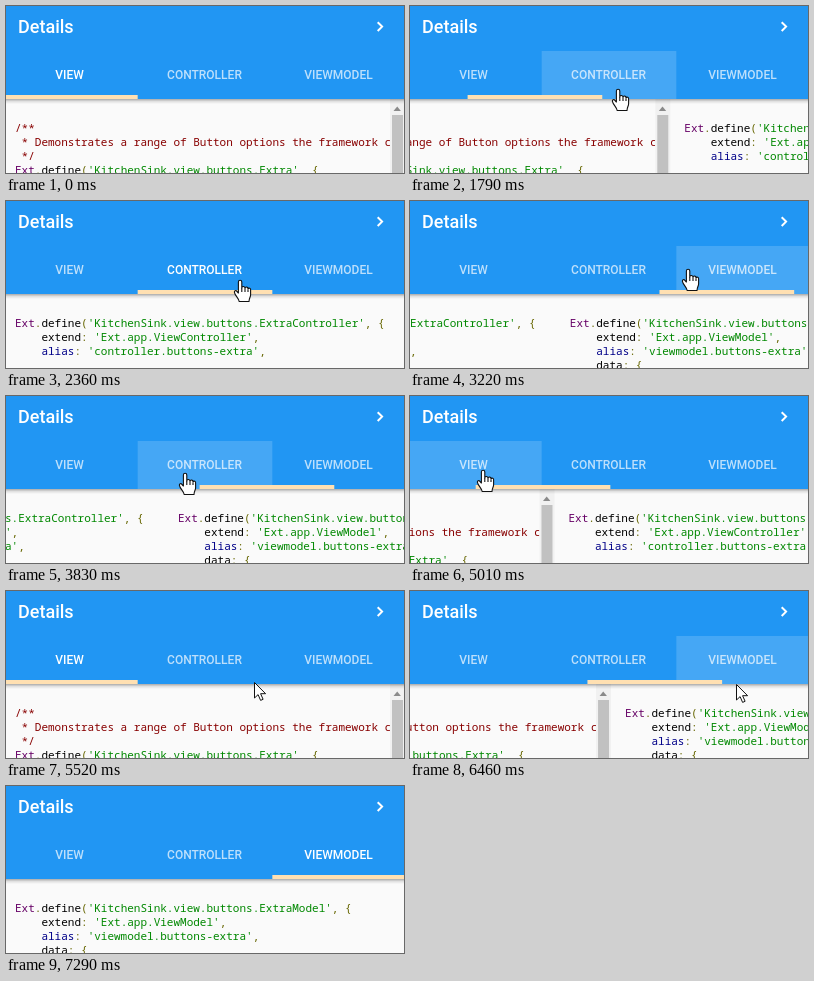
Write an HTML page that moves like this. It is 398 px wide and 167 px high and loops after 8090 ms.

```html
<!DOCTYPE html>
<html lang="en">
<head>
<meta charset="utf-8">
<title>Details tabs</title>
<style>
  html, body { margin: 0; width: 100%; height: 100%; overflow: hidden; background: #fafafa; }
  svg { display: block; width: 398px; height: 167px; }
  text { white-space: pre; }
  .title { font: 500 18px Roboto, sans-serif; fill: #fff; }
  .tab { font: 500 12px Roboto, sans-serif; fill: #fff; text-anchor: middle; }
  .code { font: 11px "Noto Sans Mono", "DejaVu Sans Mono", monospace; fill: #000; }
  .com { fill: #800; }
  .str { fill: #080; }
  .typ { fill: #606; }
  .kwd { fill: #008; }
  .pun { fill: #660; }
</style>
</head>
<body>
<svg id="stage" viewBox="0 0 398 167">
  <defs>
    <linearGradient id="shade" x1="0" y1="0" x2="0" y2="1">
      <stop offset="0" stop-color="#000" stop-opacity=".32"/>
      <stop offset=".5" stop-color="#000" stop-opacity=".1"/>
      <stop offset="1" stop-color="#000" stop-opacity="0"/>
    </linearGradient>
    <clipPath id="textArea"><rect x="-3" y="93" width="387" height="80"/></clipPath>
  </defs>
  <rect width="398" height="167" fill="#fafafa"/>
  <g id="pages"></g>
  <rect y="93" width="398" height="5" fill="url(#shade)"/>
  <rect width="398" height="93" fill="#2196f3"/>
  <text class="title" x="12" y="27">Details</text>
  <path d="M371.7 16.2l4.4 4.4-4.4 4.4" fill="none" stroke="#fff" stroke-width="2"/>
  <rect id="press" y="45" width="134.67" height="48" fill="#fff"/>
  <g id="tabs"></g>
  <rect id="bar" y="89" width="134.67" height="4" fill="#ffe0b2"/>
  <g id="cursor" stroke-linejoin="round">
    <path id="arrow" d="M.5 .5V16l3.6-3.4 2.5 5.8 2.5-1.1-2.5-5.6h5z" fill="#fff" stroke="#111"/>
    <g id="hand" fill="#fff" stroke="#111" stroke-width="1.1">
      <path d="M-1.6 13V2a1.7 1.7 0 0 1 3.4 0V8a1.6 1.6 0 0 1 3.2 .3 1.5 1.5 0 0 1 3 .6 1.4 1.4 0 0 1 2.6 1V15c0 2-1.6 3.4-1.6 6.5H-.8C-1 18.500-5 15.500-5.600 12.300c-.3-1.700 1.600-2.200 2.600-.8z"/>
      <path d="M1.800 8v4M5 8.500V12M8 9.500V12" fill="none"/>
    </g>
  </g>
</svg>
<script>
const LOOP = 8090, LEFT = -3, PAGE_W = 404, TAB_W = PAGE_W / 3;
const SLIDE_MS = 300, BAR_MS = 200, BAR_DELAY = 13;
const el = id => document.getElementById(id);
const clamp = v => Math.min(1, Math.max(0, v));

function add(parent, tag, attrs, text = '') {
  const node = document.createElementNS('http://www.w3.org/2000/svg', tag);
  for (const key in attrs) node.setAttribute(key, attrs[key]);
  node.textContent = text;
  return parent.appendChild(node);
}

const listings = [
  ['/**', ' * Demonstrates a range of Button options the framework can', ' */',
   "Ext.define('KitchenSink.view.buttons.Extra', {"],
  ["Ext.define('KitchenSink.view.buttons.ExtraController', {",
   "    extend: 'Ext.app.ViewController',", "    alias: 'controller.buttons-extra',"],
  ["Ext.define('KitchenSink.view.buttons.ExtraModel', {",
   "    extend: 'Ext.app.ViewModel',", "    alias: 'viewmodel.buttons-extra',", '    data: {']
];

function kind(token) {
  if (token[0] === "'") return 'str';
  if (token === 'Ext') return 'typ';
  if (token === 'alias') return 'kwd';
  return /^[\w\s]/.test(token) ? '' : 'pun';
}

function addLine(parent, line, y) {
  const text = add(parent, 'text', { class: 'code', x: 9, y });
  if (/^ ?[/*]/.test(line)) {
    add(text, 'tspan', { class: 'com' }, line);
    return;
  }
  for (const token of line.match(/'[^']*'|\w+|\s+|[^\w\s']+/g))
    add(text, 'tspan', { class: kind(token) }, token);
}

const pages = listings.map((lines, i) => {
  const page = add(el('pages'), 'g', {});
  const body = add(page, 'g', i ? {} : { 'clip-path': 'url(#textArea)' });
  lines.forEach((line, n) => addLine(body, line, 126 + 14 * n));
  return page;
});

// Scrollbar of the first page
add(pages[0], 'rect', { x: 384, y: 93, width: 15, height: 74, fill: '#f1f1f1' });
add(pages[0], 'path', { d: 'M387.500 105l3.700-4.500 3.700 4.500z', fill: '#8a8a8a' });
add(pages[0], 'rect', { x: 386, y: 109, width: 11, height: 58, fill: '#c1c1c1' });

const tabX = i => LEFT + TAB_W * i;
const tabs = ['VIEW', 'CONTROLLER', 'VIEWMODEL'].map((name, i) =>
  add(el('tabs'), 'text', { class: 'tab', x: [63.5, 198.5, 332.5][i], y: 73 }, name));

// Start of each switch and the tab it opens
const switches = [[-2000, 0], [1688, 1], [3033, 2], [3710, 1], [4900, 0], [6314, 2]];

// Pointer tip: time, x, y
const path = [
  [0, 274, 172], [110, 270, 168], [130, 267, 155], [300, 242, 121], [440, 242, 121],
  [770, 219, 100], [900, 219, 100], [1080, 217, 96], [1300, 217, 96], [1420, 208, 83],
  [2200, 208, 83], [2420, 243, 77], [2520, 278, 68], [2670, 278, 68], [2720, 339, 58],
  [3080, 339, 58], [3220, 278, 68], [3530, 179, 77], [4300, 179, 77], [4480, 81, 76],
  [4550, 73, 74], [5200, 73, 74], [5520, 248, 91], [5660, 249, 91], [5990, 314, 71],
  [6300, 314, 71], [6460, 326, 93], [6990, 352, 164], [7260, 352, 164], [7290, 352, 172],
  [LOOP, 352, 172]
];

function pointAt(t) {
  const i = Math.max(1, path.findIndex(p => p[0] >= t));
  const [t0, x0, y0] = path[i - 1], [t1, x1, y1] = path[i];
  const k = (t - t0) / (t1 - t0);
  return [x0 + (x1 - x0) * k, y0 + (y1 - y0) * k];
}

function drawTabs(t) {
  let n = switches.length - 1;
  while (n && switches[n][0] > t) n--;
  const [start, to] = switches[n];
  const from = n ? switches[n - 1][1] : to;
  const age = t - start;
  const dir = Math.sign(to - from);
  const slide = clamp(age / SLIDE_MS);
  const move = clamp((age - BAR_DELAY) / BAR_MS);

  pages.forEach((page, i) => {
    const shown = i === to || (i === from && slide < 1);
    const x = PAGE_W * dir * (i === to ? 1 - slide : -slide);
    page.setAttribute('visibility', shown ? 'visible' : 'hidden');
    page.setAttribute('transform', `translate(${x})`);
  });
  el('bar').setAttribute('x', tabX(from + (to - from) * move));
  el('press').setAttribute('x', tabX(to));
  el('press').setAttribute('opacity', n ? 0.16 * clamp(age / 60) * clamp((470 - age) / 200) : 0);
  tabs.forEach((tab, i) =>
    tab.setAttribute('opacity', i === to ? 0.7 + 0.3 * clamp((age - 180) / 150) : 0.7));
}

function draw(t) {
  drawTabs(t);
  const [x, y] = pointAt(t);
  const overTab = y < 90;
  el('cursor').setAttribute('transform', `translate(${Math.round(x)} ${Math.round(y)})`);
  el('hand').setAttribute('visibility', overTab ? 'visible' : 'hidden');
  el('arrow').setAttribute('visibility', overTab ? 'hidden' : 'visible');
}

const begin = performance.now();
function tick() {
  draw((performance.now() - begin) % LOOP);
  requestAnimationFrame(tick);
}
tick();
</script>
</body>
</html>
```
